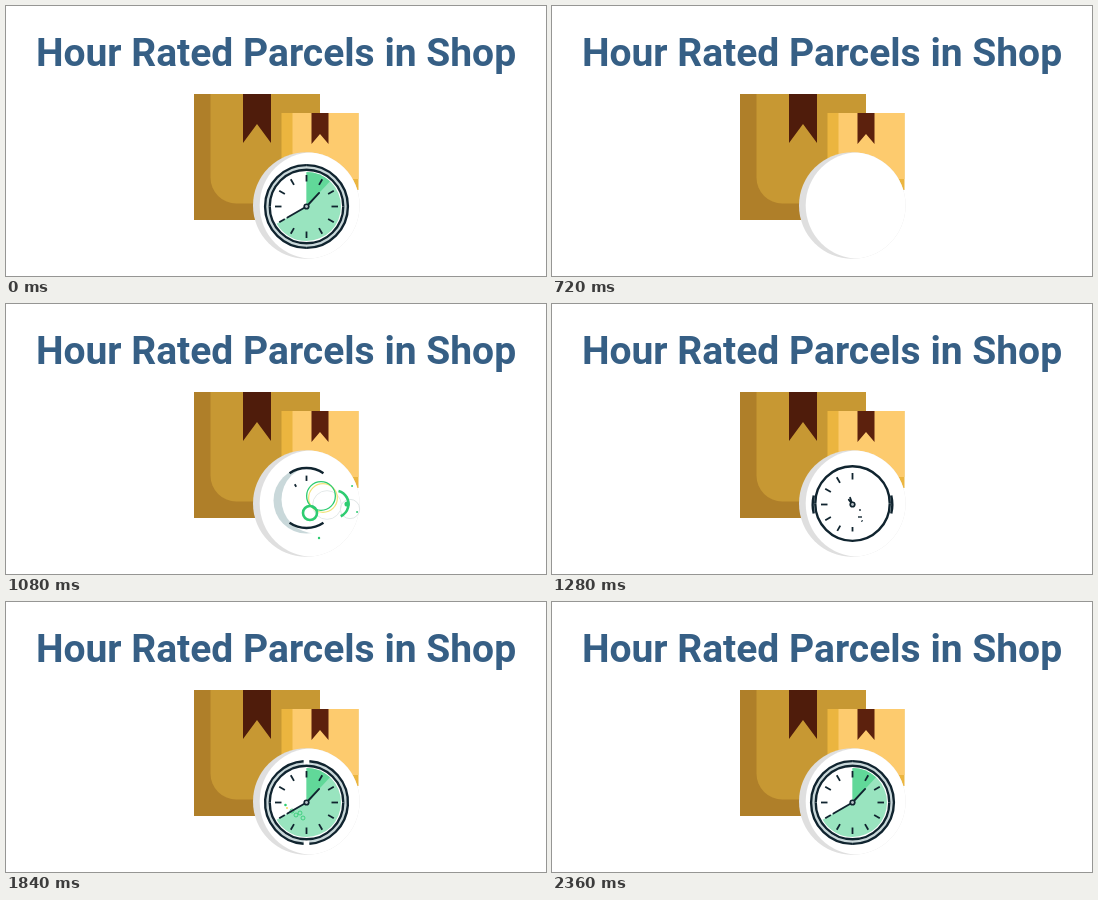
An HTML page with a canvas that plays this animation: 540x270 px, repeating every 2400 ms.

```html
<!DOCTYPE html>
<html lang="en">
<head>
<meta charset="utf-8">
<title>Timed parcels</title>
<style>
html, body { margin: 0; width: 100%; height: 100%; overflow: hidden; background: #fff; }
canvas { display: block; width: 540px; height: 270px; }
</style>
</head>
<body>
<canvas id="stage" width="540" height="270"></canvas>
<script>
const ctx = document.getElementById('stage').getContext('2d');
const LOOP = 2400, RESET = 600, TAU = Math.PI * 2;
const CX = 300.5, CY = 200.5;
const INK = '#10242f', MIST = '#c9d8da', GREEN = '#2ecc71';

const clamp = v => Math.max(0, Math.min(1, v));
const rad = deg => deg * Math.PI / 180;
const clockAngle = deg => rad(deg - 90);
const easeOut = p => 1 - (1 - p) ** 3;
const span = (t, from, to) => clamp((t - from) / (to - from));

// Piecewise smooth value through [time, value] pairs
function track(t, keys) {
  if (t <= keys[0][0]) return keys[0][1];
  for (let i = 1; i < keys.length; i++) {
    const [t0, v0] = keys[i - 1], [t1, v1] = keys[i];
    if (t <= t1) return v0 + (v1 - v0) * (t - t0) / (t1 - t0);
  }
  return keys[keys.length - 1][1];
}

function disc(x, y, r, color) {
  ctx.fillStyle = color;
  ctx.beginPath();
  ctx.arc(x, y, Math.max(0, r), 0, TAU);
  ctx.fill();
}

function arc(x, y, r, width, color, from = 0, to = TAU) {
  if (r <= 0 || width <= 0 || to <= from) return;
  ctx.strokeStyle = color;
  ctx.lineWidth = width;
  ctx.beginPath();
  ctx.arc(x, y, r, from, to);
  ctx.stroke();
}

function ray(deg, from, to, width, color = INK) {
  const a = clockAngle(deg), c = Math.cos(a), s = Math.sin(a);
  ctx.strokeStyle = color;
  ctx.lineWidth = width;
  ctx.beginPath();
  ctx.moveTo(CX + c * from, CY + s * from);
  ctx.lineTo(CX + c * to, CY + s * to);
  ctx.stroke();
}

function sector(deg, color) {
  if (deg <= 0) return;
  ctx.fillStyle = color;
  ctx.beginPath();
  ctx.moveTo(CX, CY);
  ctx.arc(CX, CY, 34.5, clockAngle(0), clockAngle(deg));
  ctx.fill();
}

function rect(x, y, w, h, color) {
  ctx.fillStyle = color;
  ctx.fillRect(x, y, w, h);
}

function ribbon(x, y, w, h, notch, color) {
  ctx.fillStyle = color;
  ctx.beginPath();
  ctx.moveTo(x, y);
  ctx.lineTo(x + w, y);
  ctx.lineTo(x + w, y + h);
  ctx.lineTo(x + w / 2, y + h - notch);
  ctx.lineTo(x, y + h);
  ctx.fill();
}

function parcel(x, y, size, inset, radius, dark, light) {
  rect(x, y, size, size, dark);
  ctx.fillStyle = light;
  ctx.beginPath();
  ctx.roundRect(x + inset, y, size - inset, size - inset, [0, 0, 0, radius]);
  ctx.fill();
}

function backdrop() {
  rect(0, 0, 540, 270, '#fff');
  ctx.fillStyle = '#365f85';
  ctx.font = '700 39px Roboto, sans-serif';
  ctx.textAlign = 'center';
  ctx.fillText('Hour Rated Parcels in Shop', 270, 60);

  parcel(188, 88, 126, 16.5, 26, '#af7f29', '#c79833');
  ribbon(237, 88, 28, 49, 19, '#4f1c0b');
  parcel(275.5, 107, 77, 11, 14, '#ebb53f', '#fdcb6e');
  ribbon(305.5, 107, 17, 31, 10, '#5c210d');

  ctx.save();
  ctx.beginPath();
  ctx.arc(300.3, 199.5, 53.3, 0, TAU);
  ctx.clip();
  rect(240, 140, 120, 120, '#dfdfdf');
  disc(307, 199.5, 53.3, '#fff');
  ctx.restore();
}

// Growing ring that thins out and disappears
function burst(t, x, y, r, width, color, start, end) {
  const p = span(t, start, end);
  if (p <= 0 || p >= 1) return;
  arc(x, y, r * easeOut(p), width * (1 - p) * 2, color);
}

function splash(t) {
  if (t < 780 || t > 1260) return;
  const grow = easeOut(span(t, 780, 1100));
  const wipe = easeOut(span(t, 860, 1220));
  disc(300.5, 196.5, 33 * grow, MIST);
  disc(300.5 + 9 * (1 - span(t, 1080, 1220)), 195.5, 36 * wipe, '#fff');

  burst(t, 344, 205, 11, 1, '#dfe5e5', 920, 1240);
  burst(t, 321, 201, 16, 1, '#e3e8e8', 900, 1240);
  burst(t, 317, 194, 16, 1.3, '#f3e27a', 900, 1240);
  burst(t, 315, 192, 16, 1.4, GREEN, 900, 1240);
  burst(t, 304, 209, 8, 2.6, GREEN, 940, 1220);

  const sweep = span(t, 920, 1080), fade = 1 - span(t, 1100, 1220);
  arc(329, 200, 13.5, 2.6 * fade, GREEN, rad(-75 * sweep), rad(65 * sweep));
  const out = track(t, [[920, 0], [1080, 1], [1220, 1.25]]);
  for (const [x, y, r] of [[341, 200, 2.6], [313, 234, 1.2], [346, 182, 1], [351, 208, 1]]) {
    disc(CX + (x - CX) * out, CY + (y - CY) * out, r * fade * sweep, GREEN);
  }
}

function innerRing(t) {
  const half = rad(track(t, [[960, 0], [1080, 34], [1240, 90]]));
  if (!half) return;
  const r = track(t, [[960, 24], [1080, 30], [1260, 37.3], [1600, 36.8]]);
  const y = track(t, [[1080, 194], [1260, 199.5], [1600, CY]]);
  for (const middle of [-TAU / 4, TAU / 4]) {
    arc(CX, y, r, 2.4, INK, middle - half, middle + half);
  }
}

function outerRing(t) {
  const half = rad(track(t, [[1220, 0], [1280, 13], [1400, 38], [1600, 66], [1840, 86], [1960, 90.2]]));
  const r = track(t, [[1220, 39.5], [1600, 41.4]]);
  for (const middle of [0, Math.PI]) {
    arc(CX, CY, r - 2.2, 2.5, MIST, middle - half, middle + half);
    arc(CX, CY, r, 2.4, INK, middle - half, middle + half);
  }
}

function ticks(t) {
  for (let i = 0; i < 12; i++) {
    const p = easeOut(span(t, 1020 + i * 36, 1160 + i * 36));
    if (p > 0) ray(-30 * i, 17 + 8 * p, 17 + 8 * p + 6.5 * p, 1.8);
  }
}

function specks(t) {
  const early = Math.sin(Math.PI * span(t, 1480, 1720));
  for (const [x, y] of [[295, 180.5], [298, 180], [318, 182], [292, 211], [293.5, 214]]) {
    disc(x, y, 1.1 * early, GREEN);
  }
  const late = Math.sin(Math.PI * span(t, 1740, 1960));
  disc(279.5, 203, 1.3 * late, GREEN);
  disc(281, 206, late, '#f3d95a');
  for (const [x, y] of [[286, 209], [290, 213], [294, 211], [297, 216]]) {
    arc(x, y, 2 * late, 0.8, GREEN);
  }
  const dust = Math.sin(Math.PI * span(t, 1200, 1360));
  for (const [x, y] of [[308, 206], [307, 213], [309, 213]]) disc(x, y, 0.9 * dust, INK);
}

function hands(t) {
  const size = track(t, [[1160, 0], [1280, 0.32], [1440, 0.9], [1600, 1]]);
  if (!size) return;
  const hour = track(t, [[1160, -60], [1280, -38], [1600, 33], [1840, 43]]);
  const minute = track(t, [[1160, -70], [1280, -20], [1600, 83], [1720, 168], [1840, 240]]);
  ctx.lineCap = 'round';
  ray(hour, 0, 18.5 * size, 1.9);
  ray(minute, 0, 22 * size, 1.9);
  ctx.lineCap = 'butt';
  disc(CX, CY, 3.1, INK);
  disc(CX, CY, 1.4, '#b9c3c9');
}

function draw(now) {
  const phase = now % LOOP;
  const t = phase < RESET ? phase + LOOP : phase;
  backdrop();
  splash(t);
  sector(track(t, [[1440, 0], [1600, 41], [1720, 150], [1840, 240]]), '#99e4bf');
  sector(track(t, [[1600, 0], [1800, 43]]), '#61d899');
  outerRing(t);
  innerRing(t);
  ticks(t);
  specks(t);
  hands(t);
}

const begin = performance.now();
function frame() {
  draw(performance.now() - begin);
  requestAnimationFrame(frame);
}
frame();
</script>
</body>
</html>
```
